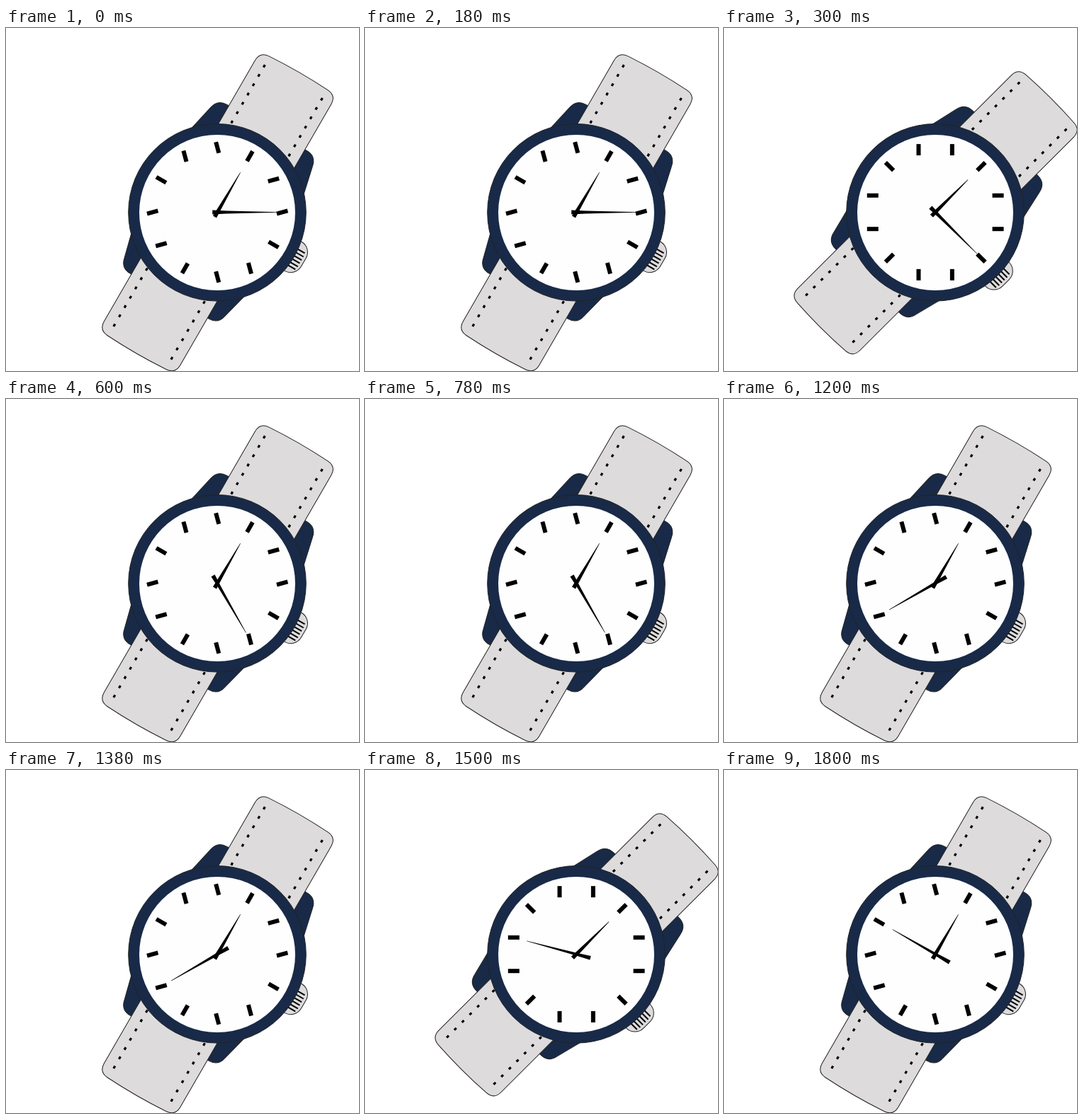
These frames come from a looping animation (498x485 px, 2100 ms). An HTML page:

```html
<!DOCTYPE html>
<html lang="en">
<head>
<meta charset="utf-8">
<title>Wristwatch</title>
<style>
  html, body { margin: 0; width: 100%; height: 100%; overflow: hidden; background: #fff; }
  svg { display: block; }
  .leather { fill: #dddbdc; stroke: #222; }
  .metal { fill: #182a48; stroke: #222; }
</style>
</head>
<body>
<svg width="498" height="485" viewBox="0 0 498 485">
  <g id="body">
    <path class="metal" d="M-96-66L-83-124Q-80-139-65-139H65Q80-139 83-124L96-66V66L82 121Q79 136 64 136H-64Q-79 136-82 121L-96 66Z"/>
    <path class="leather" d="M-62-213Q-62-227-48-228Q0-231 48-228Q62-227 62-213V213Q62 227 48 228Q0 231-48 228Q-62 227-62 213Z"/>
    <path d="M-46.8-214.5V-117M46.8-214.5V-117M-46.8 212.5V115M46.8 212.5V115"
      fill="none" stroke="#000" stroke-width="3.2" stroke-dasharray="4 11.2"/>
    <rect class="leather" x="104" y="-23.7" width="36" height="47.4" rx="17"/>
    <path d="M118-12h17m-17 5.3h18m-18 5.3h18m-18 5.3h18m-18 5.3h18m-18 5.3h17"
      stroke="#000" stroke-width="2"/>
  </g>
  <circle class="metal" cx="298" cy="260.8" r="125.3"/>
  <circle cx="298" cy="261" r="110" fill="#fefefe"/>
  <g id="dial">
    <g id="ticks"></g>
    <path id="hour" d="M-72.5-2.9L0-.3V.3L-72.5 2.9Z"/>
    <path id="minute" d="M-93-2.9L-73-2 0-.3V.3L-73 2-93 2.9Z"/>
  </g>
</svg>
<script>
const STEP = 300;
const STEPS = 7;
const $ = id => document.getElementById(id);
const setTransform = (id, value) => $(id).setAttribute("transform", value);

// Diagonal ticks point outward; the others stay square to the dial.
$("ticks").innerHTML = Array.from({ length: 12 }, (_, i) => {
  const angle = i * 30 + 15;
  const tilt = i % 3 === 1 ? 0 : Math.round(angle / 90) * 90 - angle;
  return `<rect x="-3" y="-8" width="6" height="16"
    transform="rotate(${angle}) translate(0 -91.5) rotate(${tilt})"/>`;
}).join("");

function draw(time) {
  const step = Math.floor(time / STEP) % STEPS;
  const sway = step % 2 ? 0 : -15;
  const mark = step < 3 ? step : step + 1; // the minute hand skips one mark
  const reach = 86 - 2.7 * step;           // and slides back a little each step

  setTransform("body", `translate(298.6 261.3) rotate(${45 + sway})`);
  setTransform("dial", `translate(298.2 260.5) rotate(${sway})`);
  setTransform("hour", "rotate(-45) translate(65)");
  setTransform("minute", `rotate(${15 + 30 * mark}) translate(${reach})`);
}

const start = performance.now();
function loop() {
  draw(performance.now() - start);
  requestAnimationFrame(loop);
}
loop();
</script>
</body>
</html>
```
